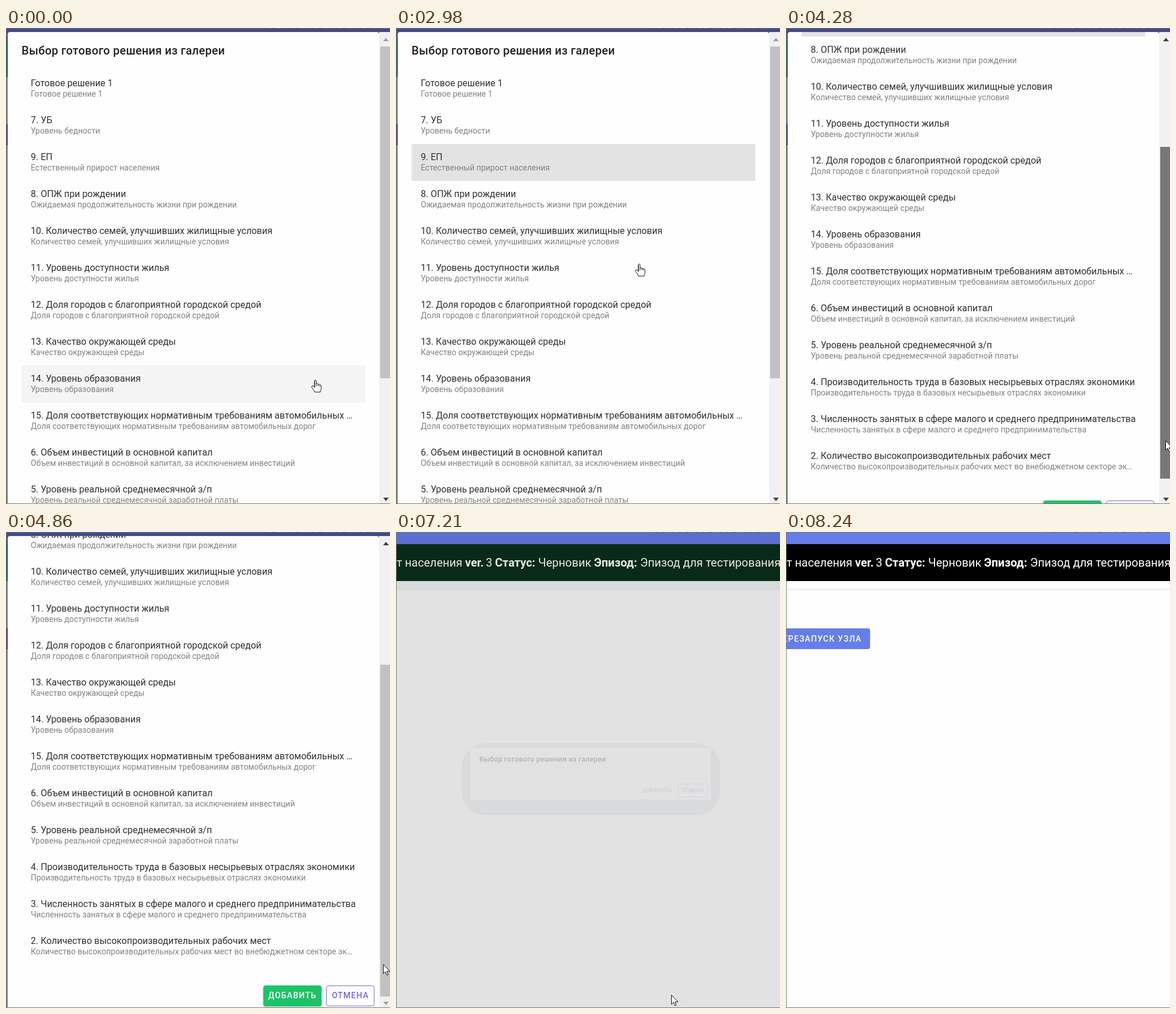
An HTML page that plays this animation: 667x825 px, repeating every 8550 ms.

```html
<!DOCTYPE html>
<html lang="ru">
<head>
<meta charset="utf-8">
<style>
  html, body { margin: 0; width: 100%; height: 100%; overflow: hidden; background: #fefefe; }
  svg { display: block; width: 667px; height: 825px; font-family: Roboto, sans-serif; }
  text { white-space: pre; }
  .title { font-size: 20px; font-weight: 500; letter-spacing: .0125em; fill: #212121; }
  .primary { font-size: 16px; fill: #303030; }
  .secondary { font-size: 14px; fill: #828282; }
  .button { font-size: 14px; font-weight: 500; letter-spacing: .0892857em; fill: #fff; }
  .header { font-size: 20px; fill: var(--ink); }
  .bold { font-weight: 700; }
</style>
</head>
<body>
<svg id="stage" viewBox="0 0 667 825"></svg>
<script>
const LOOP = 8550, ROW_TOP = 73, ROW_HEIGHT = 64;

// Title, then subtitle where it differs from the title without its number.
const items = [
  ['Готовое решение 1'],
  ['7. УБ', 'Уровень бедности'],
  ['9. ЕП', 'Естественный прирост населения'],
  ['8. ОПЖ при рождении', 'Ожидаемая продолжительность жизни при рождении'],
  ['10. Количество семей, улучшивших жилищные условия'],
  ['11. Уровень доступности жилья'],
  ['12. Доля городов с благоприятной городской средой'],
  ['13. Качество окружающей среды'],
  ['14. Уровень образования'],
  ['15. Доля соответствующих нормативным требованиям автомобильных …',
   'Доля соответствующих нормативным требованиям автомобильных дорог'],
  ['6. Объем инвестиций в основной капитал',
   'Объем инвестиций в основной капитал, за исключением инвестиций'],
  ['5. Уровень реальной среднемесячной з/п',
   'Уровень реальной среднемесячной заработной платы'],
  ['4. Производительность труда в базовых несырьевых отраслях экономики'],
  ['3. Численность занятых в сфере малого и среднего предпринимательства'],
  ['2. Количество высокопроизводительных рабочих мест',
   'Количество высокопроизводительных рабочих мест во внебюджетном секторе эк…'],
];

const rect = (x, y, w, h, fill, extra = '') =>
  `<rect x="${x}" y="${y}" width="${w}" height="${h}" fill="${fill}" ${extra}/>`;
const text = (x, y, cls, str, extra = '') =>
  `<text x="${x}" y="${y}" class="${cls}" ${extra}>${str}</text>`;

const rows = items.map(([title, subtitle = title.replace(/^\d+\. /, '')], i) => {
  const y = ROW_TOP + i * ROW_HEIGHT;
  return text(43, y + 28, 'primary', title) + text(43, y + 46, 'secondary', subtitle);
}).join('');

const headerText = [
  [1, 'т населения'], [120, 'ver.', 1], [156, '3'], [172, 'Статус:', 1],
  [247, 'Черновик'], [344, 'Эпизод:', 1], [424, 'Эпизод для тестирования'],
].map(([x, str, bold]) => text(x, 60, bold ? 'header bold' : 'header', str)).join('');

const dialog = `
  <g id="dialog">
    ${rect(0, 0, 667, 825, '#808080')}
    ${rect(0, 0, 667, 21, '#424a8b')}
    ${rect(1, 21, 3, 64, '#126046')}
    ${rect(1, 167, 3, 36, '#3c4489')}
    ${rect(3, 7, 645, 830, '#fefefe', 'rx="4"')}
    <g clip-path="url(#dialogClip)">
      <g id="content">
        ${rect(27, 0, 597, ROW_HEIGHT, '#f4f4f4', 'id="hover"')}
        ${rect(27, ROW_TOP + 2 * ROW_HEIGHT, 597, ROW_HEIGHT, '#e3e3e3', 'id="selected"')}
        <circle id="rowRipple" cx="359" cy="233" r="230" fill="#dcdcdc" clip-path="url(#rowClip)"/>
        ${text(27, 46, 'title', 'Выбор готового решения из галереи')}
        ${rows}
        ${rect(447, 1070, 101, 36, '#000', 'id="shadow" rx="4" filter="url(#blur)"')}
        ${rect(447, 1069, 101, 36, '#1bc368', 'rx="4"')}
        ${rect(447, 1069, 101, 36, '#fff', 'id="buttonGlow" rx="4"')}
        ${text(455.5, 1091, 'button', 'ДОБАВИТЬ')}
        ${rect(556.5, 1069.5, 83, 35, '#fefefe', 'rx="4" stroke="#7c60e2"')}
        ${text(566, 1091, 'button', 'ОТМЕНА', 'style="fill:#7c60e2"')}
      </g>
    </g>
    ${rect(648, 7, 19, 818, '#f1f1f1')}
    ${rect(650, 32, 17, 575, '#c1c1c1', 'id="thumb"')}
    <path id="upArrow" d="M655 23l5-6 5 6z"/>
    <path id="downArrow" d="M655 814l5 6 5-6z"/>
  </g>`;

const page = `
  <g id="page">
    ${rect(0, 0, 667, 825, '#fefefe')}
    ${rect(0, 0, 667, 21, '#667eea', 'id="topBar"')}
    ${rect(0, 21, 667, 64, '#000', 'id="header"')}
    ${rect(0, 98, 667, 3, '#eeeef6')}
    ${headerText}
    <g id="restart">
      ${rect(-20, 167, 166, 36, '#667eea', 'rx="4"')}
      ${text(131.5, 190, 'button', 'ПЕРЕЗАПУСК УЗЛА', 'text-anchor="end"')}
    </g>
    <g id="closing">
      ${rect(0, 85, 667, 740, '#e2e2e2')}
      ${rect(0, 85, 667, 16, '#d9dadc')}
      ${rect(114, 366, 449, 125, '#d8dadc', 'rx="42"')}
      ${rect(129, 374, 418, 90, '#e2e2e2', 'rx="2"')}
      <g transform="translate(128 369.4) scale(.622)">
        ${text(27, 46, 'title', 'Выбор готового решения из галереи', 'style="fill:#b5b5b5"')}
        ${text(482, 132, 'button', 'ДОБАВИТЬ', 'style="fill:#cfcfd1"')}
        ${rect(582, 108, 84, 36, 'none', 'rx="4" stroke="#cdcbe0"')}
        ${text(591.5, 132, 'button', 'ОТМЕНА', 'style="fill:#cfcce4"')}
      </g>
    </g>
  </g>`;

const cursors = `
  <g fill="#fff" stroke="#111" stroke-linejoin="round">
    <path id="arrow" d="M.5.5V16.5L4 13.2 6.6 19l2.3-1L6.5 12.3H11.7Z"/>
    <path id="hand" d="M-2 1.5C-2-.5 1-.5 1 1.5V7C2 6 4 6.3 4.3 7.8 5.3 7 7 7.5 7.2 8.8 8.5 8.2
      9.5 9 9.5 10.5V14C9.5 17 8 17.5 8 21H-2C-2 18.5-6.5 14-7 12-7.3 10-5 9.5-4 11L-2 13Z
      M-2 1.5V13M1 7V11M4.3 8V11M7.2 9V11.5"/>
  </g>`;

const frameEdges = `
  <path d="M0 .5H667M.5 0V825M0 824.5H667" stroke="#777" fill="none"/>
  <path d="M450 .5H640" stroke="#555" stroke-dasharray="3 9 5 14 2 8"/>`;

document.getElementById('stage').innerHTML = `
  <defs>
    <clipPath id="dialogClip">${rect(3, 7, 645, 817, '#000')}</clipPath>
    <clipPath id="rowClip">${rect(27, 201, 597, 64, '#000')}</clipPath>
    <filter id="blur" x="-20%" y="-40%" width="140%" height="180%">
      <feGaussianBlur stdDeviation="1.6"/>
    </filter>
  </defs>${dialog}${page}${frameEdges}${cursors}`;

const el = Object.fromEntries([...document.querySelectorAll('[id]')].map(e => [e.id, e]));
const show = (node, on) => node.style.display = on ? '' : 'none';
const set = (node, name, value) => node.setAttribute(name, value);

// Held values: each entry is [start time, ...values].
const cursorTrack = [
  [0, 538, 610, 'hand'],
  [730, 533, 600, 'hand'], [880, 508, 555, 'hand'], [1030, 468, 470, 'hand'],
  [1180, 424, 375, 'hand'], [1340, 388, 295, 'hand'], [1490, 366, 240, 'hand'],
  [1640, 360, 220, 'hand'], [1790, 359, 216, 'hand'],
  [2820, 371, 275, 'hand'], [2980, 423, 409, 'hand'], [3120, 500, 480, 'hand'],
  [3260, 575, 520, 'hand'], [3400, 630, 535, 'hand'], [3540, 655, 537, 'arrow'],
  [3690, 659, 534, 'arrow'], [3980, 659, 572, 'arrow'], [4130, 659, 640, 'arrow'],
  [4280, 659, 715, 'arrow'], [4410, 659, 749, 'arrow'], [4860, 655, 749, 'arrow'],
  [5010, 610, 766, 'arrow'], [5150, 535, 790, 'hand'], [5300, 488, 801, 'hand'],
  [5440, 479, 802, 'hand'], [7210, 478, 802, 'arrow'],
  [7810, 488, 806, 'arrow'], [7960, 508, 818, 'arrow'], [8110, 520, 830, 'arrow'],
];
const scrollTrack = [[0, 0], [3980, 58], [4130, 150], [4280, 250], [4410, 283]];
const thumbTrack = [[0, '#c1c1c1'], [3540, '#a8a8a8'], [3830, '#787878'], [4860, '#c1c1c1']];
const selectTrack = [[0, 'none'], [2220, '#ebebeb'], [2370, '#dadada'], [2520, '#e3e3e3']];
const glowTrack = [[0, 0], [5150, .08], [5870, .2], [6020, .3], [6160, .24], [6300, .16]];
const at = (track, t) => track.findLast(entry => entry[0] <= t).slice(1);

function draw(t) {
  const [x, y, pointer] = at(cursorTrack, t);
  const [scroll] = at(scrollTrack, t);
  const closing = t >= 7210 && t < 7360;

  show(el.dialog, t < 7210);
  show(el.page, t >= 7210);
  show(el.closing, closing);
  show(el.restart, t >= 7810);
  set(el.topBar, 'fill', closing ? '#5c6fd0' : '#667eea');
  set(el.header, 'fill', closing ? '#0a2a18' : '#000');
  el.page.style.setProperty('--ink', closing ? '#e4e8e5' : '#fff');

  set(el.content, 'transform', `translate(0 ${-scroll})`);
  const row = Math.floor((y + 5 - ROW_TOP) / ROW_HEIGHT);
  set(el.hover, 'y', ROW_TOP + row * ROW_HEIGHT);
  show(el.hover, t < 2820);
  set(el.selected, 'fill', at(selectTrack, t)[0]);
  show(el.rowRipple, t >= 2220 && t < 2370);
  set(el.buttonGlow, 'opacity', at(glowTrack, t)[0]);
  set(el.shadow, 'opacity', t >= 5870 && t < 6300 ? .6 : .35);

  set(el.thumb, 'y', 32 + Math.floor(scroll * 198 / 283));
  set(el.thumb, 'fill', at(thumbTrack, t)[0]);
  set(el.upArrow, 'fill', scroll > 0 ? '#404040' : '#a3a3a3');
  set(el.downArrow, 'fill', scroll < 283 ? '#404040' : '#a3a3a3');

  for (const name of ['arrow', 'hand']) {
    show(el[name], name === pointer);
    set(el[name], 'transform', `translate(${x} ${y})`);
  }
}

function tick() {
  draw(performance.now() % LOOP);
  requestAnimationFrame(tick);
}
tick();
</script>
</body>
</html>
```
